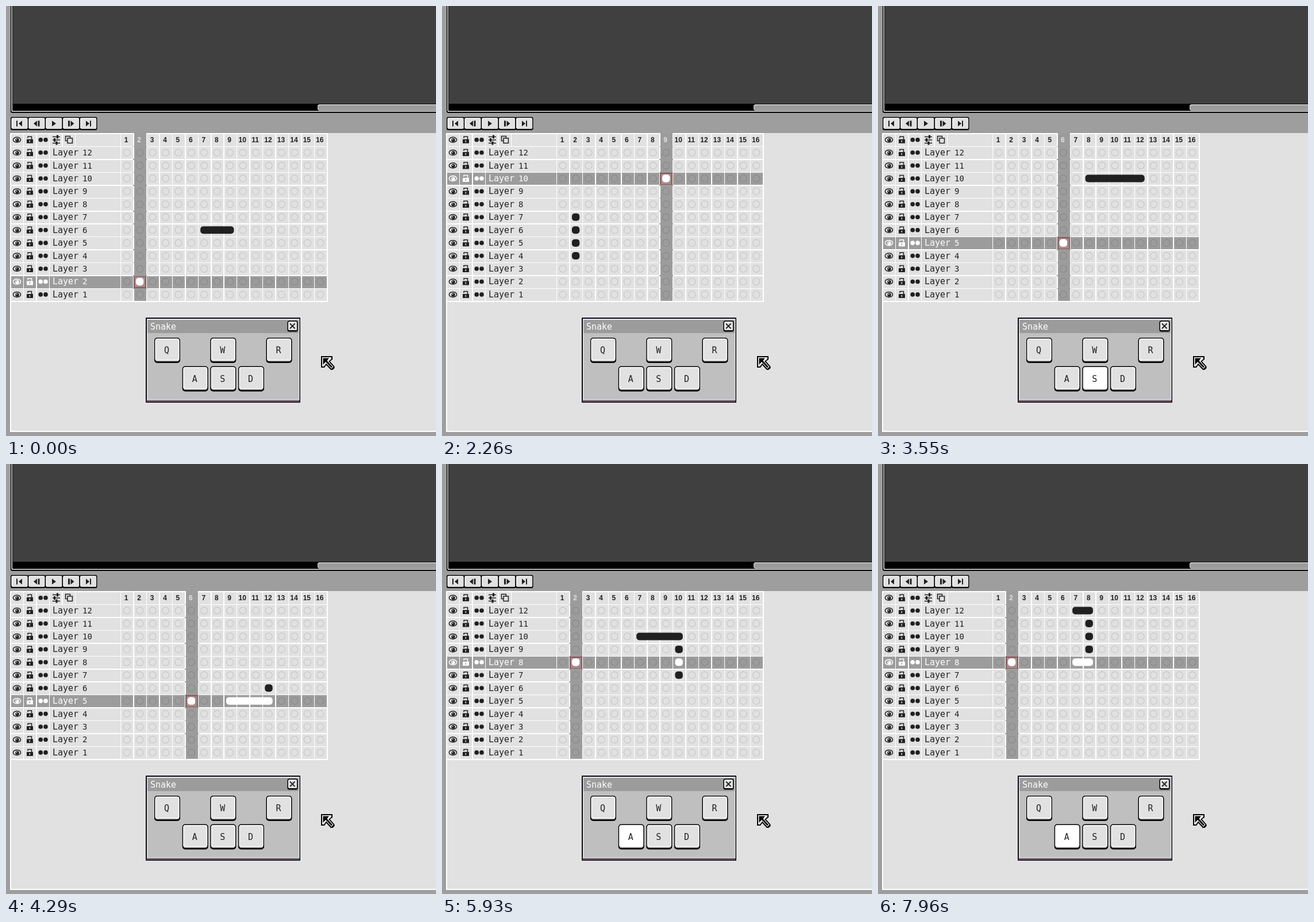
An HTML page with a canvas for the animation above (8 s loop, 748x748 px).

```html
<!DOCTYPE html>
<html lang="en">
<head>
<meta charset="utf-8">
<title>Timeline snake</title>
<style>
  html, body { margin: 0; height: 100%; overflow: hidden; background: #9e9e9e; }
  canvas { display: block; width: 100%; height: 100%; }
</style>
</head>
<body>
<canvas id="stage" width="748" height="748"></canvas>
<script>
const ctx = document.getElementById('stage').getContext('2d');
const K = 1.496;                       // size of one interface pixel
const LOOP = 8000;
const INK = '#202020', LIGHT = '#e1e1e1', GRAY = '#9c9c9c', WHITE = '#fff', BLACK = '#000';
const MONO = '"DejaVu Sans Mono", monospace';

// ---- game ----
const ROUTE = 'D4 S4 A11 W8 D10 S5 A7 W5 D5 S3 A7 W5 D5 S4 A1';
const DIR = { W: [0, 1], S: [0, -1], A: [-1, 0], D: [1, 0] };
const FOODS = [[2, 2], [9, 10], [6, 5], [7, 10], [2, 8]];
// runs of evenly timed moves: first time, last time, count
const RUNS = [
  [120, 830, 9], [950, 1360, 5], [1420, 1750, 4], [1810, 2260, 6], [2380, 2560, 3],
  [2680, 3400, 9], [3550, 3550, 1], [3620, 3870, 4], [4020, 4740, 9], [4860, 4860, 1],
  [4920, 5580, 8], [5700, 5880, 3], [6030, 6470, 6], [6560, 6820, 4], [6970, 7310, 4],
  [7450, 7960, 8]
];
const LATE_KEYS = [1, 2, 3, 10, 11, 12];   // turns whose key lights after the corner is reached

const times = RUNS.flatMap(([a, b, n]) =>
  Array.from({ length: n }, (_, i) => Math.round((a + (b - a) * i / (n - 1 || 1)) / 10) * 10));
const path = [[7, 6], [8, 6], [9, 6]];
const presses = [];
ROUTE.split(' ').forEach((leg, i) => {
  const key = leg[0], [dx, dy] = DIR[key];
  const corner = path.length - 4;          // index of the move that reached the corner
  if (i) presses.push({
    key,
    on: times[corner] + (LATE_KEYS.includes(i) ? 50 : 0),
    off: times[corner + 2] ?? LOOP
  });
  for (let n = +leg.slice(1); n--;) {
    const [x, y] = path.at(-1);
    path.push([x + dx, y + dy]);
  }
});

function gameAt(t) {
  const head = 2 + times.filter(m => m <= t).length;
  let eaten = 0;
  for (let i = 3; i <= head; i++) {
    const [x, y] = FOODS[eaten];
    if (path[i][0] === x && path[i][1] === y) eaten++;
  }
  return {
    body: path.slice(head - 2 - eaten, head + 1),
    food: FOODS[eaten],
    key: presses.find(p => t >= p.on && t < p.off)?.key
  };
}

// ---- drawing helpers ----
const px = n => Math.round(n * K);
function box(x, y, w, h, color) {
  ctx.fillStyle = color;
  ctx.fillRect(px(x), px(y), px(x + w) - px(x), px(y + h) - px(y));
}
function round(x, y, w, h, r, color) {
  ctx.fillStyle = color;
  ctx.beginPath();
  ctx.roundRect(x, y, w, h, r);
  ctx.fill();
}
function poly(color, ...p) {
  ctx.fillStyle = color;
  ctx.beginPath();
  for (let i = 0; i < p.length; i += 2) ctx.lineTo(p[i], p[i + 1]);
  ctx.fill();
}
function line(color, width, ...p) {
  ctx.strokeStyle = color;
  ctx.lineWidth = width;
  ctx.beginPath();
  for (let i = 0; i < p.length; i += 4) {
    ctx.moveTo(p[i], p[i + 1]);
    ctx.lineTo(p[i + 2], p[i + 3]);
  }
  ctx.stroke();
}
function disc(x, y, r, color) {
  ctx.fillStyle = color;
  ctx.beginPath();
  ctx.arc(x, y, r, 0, 7);
  ctx.fill();
}
function text(s, x, y, color, font = '15px ' + MONO, align = 'left') {
  ctx.font = font;
  ctx.textAlign = align;
  ctx.textBaseline = 'alphabetic';
  ctx.fillStyle = color;
  ctx.fillText(s, x, y);
}
function button(x, y, w, h, fill) {
  round(x, y, w, h, 3, BLACK);
  round(x + 1.5, y + 1.5, w - 3, h - 4, 2, WHITE);
  round(x + 3, y + 3, w - 4.5, h - 5.5, 1, fill);
}

// ---- parts ----
const colLeft = c => 119 + 15 * c;
const rowTop = r => 344 - 15 * r;
const colMid = c => (colLeft(c) + 6.5) * K;
const rowMid = r => (rowTop(r) + 6.5) * K;

function rowIcons(y, color, hole) {
  ctx.strokeStyle = color;
  ctx.lineWidth = 1.5;
  ctx.beginPath();
  ctx.ellipse(19, y, 6.6, 4.5, 0, 0, 7);
  ctx.stroke();
  disc(19.5, y + .5, 3.2, color);
  disc(18.5, y - .5, .9, hole);
  ctx.fillStyle = color;
  ctx.fillRect(36, y - 1, 11, 7);
  ctx.strokeStyle = color;
  ctx.beginPath();
  ctx.moveTo(38, y - 3);
  ctx.lineTo(38, y - 5.5);
  ctx.lineTo(44.5, y - 5.5);
  ctx.lineTo(44.5, y);
  ctx.stroke();
  ctx.fillStyle = hole;
  ctx.fillRect(40.5, y + 1, 1.6, 3);
  disc(60.2, y, 3.8, color);
  disc(69, y, 3.8, color);
}

function editor() {
  box(0, 0, 500, 500, '#9e9e9e');
  round(8, -9, 760, 195, 3, BLACK);
  round(9.5, -9, 760, 193, 2, '#eee');
  round(11, -9, 760, 191.5, 1, BLACK);
  box(8, 0, 492, 113.6, '#404040');
  round(542, 171, 220, 11, 4, '#d0d0d0');
  round(543, 172.5, 220, 9, 4, GRAY);
}

function playback() {
  for (let i = 0; i < 5; i++) button(8 + 29.9 * i, 193, 31, 23, LIGHT);
  const y = 204.5;
  const bar = (x, w = 2) => { ctx.fillStyle = INK; ctx.fillRect(x, y - 5, w, 10); };
  const tri = (x, d) => poly(INK, x, y - 5, x, y + 5, x + d, y);
  bar(18); tri(28, -6);
  tri(54, -6); bar(55.5, 3);
  tri(80, 7);
  bar(108, 3); tri(112.5, 6);
  tri(139, 6); bar(146);
}

function timeline({ body, food: [fc, fr] }) {
  box(5, 148, 495, 347, LIGHT);
  box(5, 148, 1, 347, WHITE);
  box(5, 494, 495, 1, WHITE);
  box(6, rowTop(fr), 367, 14, GRAY);
  for (let y = 148; y <= 343; y += 15) box(5, y, 369, 1, WHITE);
  for (const x of [5, 20, 35, 50]) box(x, 148, 1, 195, WHITE);
  for (const x of [65, 80]) box(x, 148, 1, 15, WHITE);
  for (let x = 133; x <= 373; x += 15) box(x, 148, 1, 196, WHITE);

  box(colLeft(fc), 148, 14, 195, GRAY);
  for (let y = 163; y < 343; y += 15) {
    box(colLeft(fc) - 1, y, 1, 1, GRAY);
    box(colLeft(fc) + 14, y, 1, 1, GRAY);
  }

  rowIcons(232.8, INK, LIGHT);
  line(INK, 1.5, 81, 227.5, 94, 227.5, 81, 233, 94, 233, 81, 238.5, 94, 238.5);
  line(INK, 3, 89.5, 224.5, 89.5, 230.5, 84.5, 230, 84.5, 236, 88, 235.5, 88, 241.5);
  ctx.strokeStyle = INK;
  ctx.lineWidth = 1.5;
  ctx.strokeRect(103.5, 226.5, 8, 8);
  ctx.fillStyle = LIGHT;
  ctx.fillRect(107, 230, 8.5, 8.5);
  ctx.strokeRect(107, 230, 8.5, 8.5);

  for (let r = 1; r <= 12; r++) {
    const on = r === fr, y = rowMid(r), color = on ? WHITE : INK;
    rowIcons(y, color, on ? GRAY : LIGHT);
    text('Layer', 81, y + 5, color);
    text(r, 133, y + 5, color, '14px ' + MONO);
  }
  for (let c = 1; c <= 16; c++)
    text(c, colMid(c) - 1, 237.3, c === fc ? LIGHT : INK,
      'bold 12px "Liberation Sans", sans-serif', 'center');

  const filled = (c, r) => body.some(([x, y]) => x === c && y === r);
  for (let r = 1; r <= 12; r++) for (let c = 1; c <= 16; c++) {
    const x = colMid(c), y = rowMid(r), dark = c === fc || r === fr;
    if (c === fc && r === fr) {
      const l = colLeft(c), t = rowTop(r);
      box(l - .5, t, 14.5, 14, '#8a5658');
      box(l + 1, t + 1, 12, 12, '#a58c8c');
      round(x - 6.7, y - 6.7, 13.4, 13.4, 5, WHITE);
    } else if (filled(c, r)) {
      const a = filled(c - 1, r), b = filled(c + 1, r);
      const left = a ? px(colLeft(c) - 1) : x - 6.7;
      const right = b ? px(colLeft(c) + 14) : x + 6.7;
      const ra = a ? 0 : 5, rb = b ? 0 : 5;
      round(left, y - 6.5, right - left, 13, [ra, rb, rb, ra], dark ? WHITE : INK);
    } else {
      ctx.strokeStyle = dark ? '#8b8b8b' : '#c9c9c9';
      ctx.lineWidth = 1.3;
      ctx.beginPath();
      ctx.arc(x, y, 6, 0, 7);
      ctx.stroke();
    }
  }
}

function dialog(lit) {
  round(243, 542, 269, 148, 1, '#0c0a10');
  ctx.fillStyle = '#705e68';
  ctx.fillRect(244.5, 684, 266, 4.5);
  ctx.fillStyle = '#dfe3ec';
  ctx.fillRect(245, 544, 265.5, 141.5);
  ctx.fillStyle = '#bfbfbf';
  ctx.fillRect(246.5, 546, 262.5, 138);
  ctx.fillStyle = GRAY;
  ctx.fillRect(246.5, 546, 262.5, 23);
  text('Snake', 251, 562.5, WHITE);
  button(489.5, 547.5, 18, 19, LIGHT);
  line(INK, 1.8, 494, 552.5, 502.5, 561, 502.5, 552.5, 494, 561);

  const keys = { Q: [258, 577], W: [355.3, 577], R: [452.5, 577], A: [306.7, 626.5], S: [355.3, 626.5], D: [404, 626.5] };
  for (const [name, [x, y]] of Object.entries(keys)) {
    round(x, y, 45, 44, 5, BLACK);
    round(x + 1.5, y + 1.5, 42, 40, 4, '#8e8a8a');
    round(x + 1.5, y + 1.5, 42, 38.5, 4, WHITE);
    round(x + 3, y + 3, 39, 35.5, 3, name === lit ? WHITE : LIGHT);
    text(name, x + 21.5, y + 27, INK, '15px ' + MONO, 'center');
  }
}

function cursor() {
  poly(BLACK, 548, 609, 568, 609, 568, 615, 563.5, 618, 571.5, 627, 571.5, 630, 568, 633, 565, 633, 557, 624.5, 554, 629, 548, 629);
  poly(WHITE, 550, 611, 566, 611, 566, 614, 561, 618, 569.5, 627.5, 566, 631, 557, 621.5, 553, 627, 550, 627);
  poly(BLACK, 551.5, 612.5, 562, 612.5, 558.5, 617, 568, 627.5, 566, 629.5, 556, 619, 551.5, 624);
}

function frame(now) {
  const game = gameAt(now % LOOP);
  editor();
  playback();
  timeline(game);
  dialog(game.key);
  cursor();
  requestAnimationFrame(frame);
}
requestAnimationFrame(frame);
</script>
</body>
</html>
```
